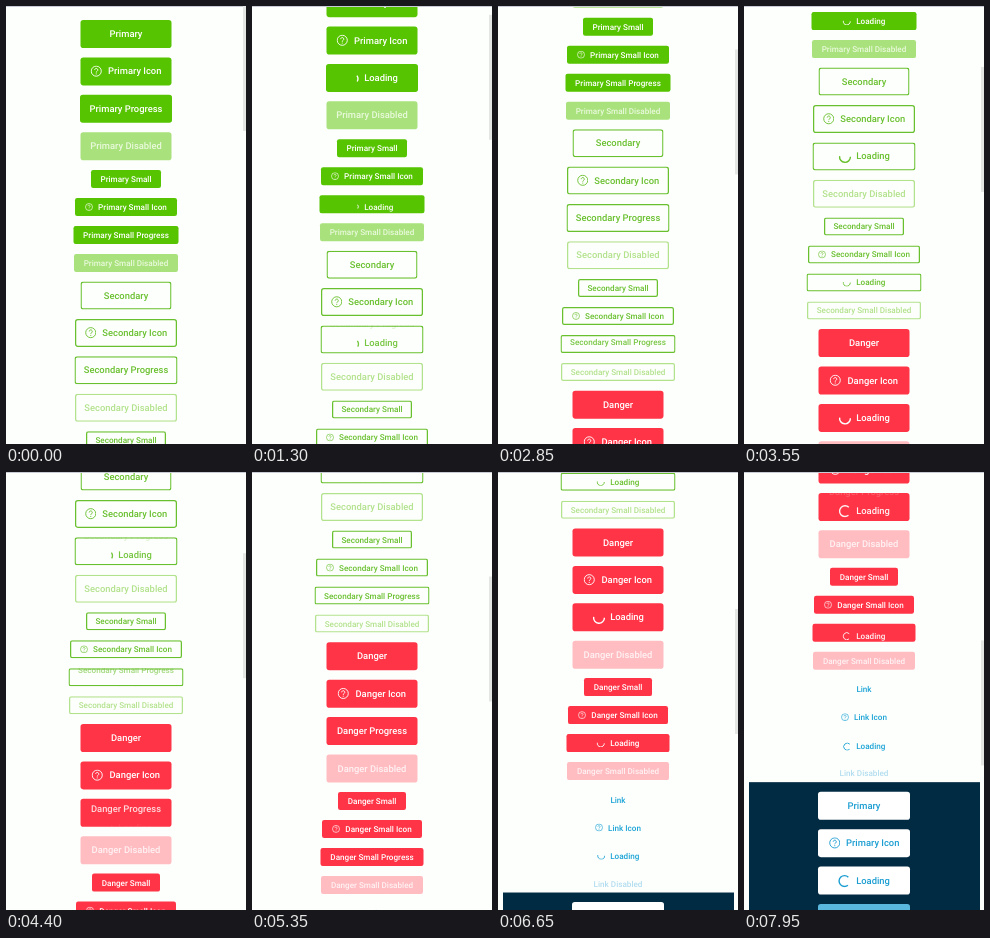
An HTML page for the animation above (8000 ms loop, 240 px wide and 438 px high).

```html
<!DOCTYPE html>
<html lang="en">
<head>
<meta charset="utf-8">
<title>Button styles</title>
<style>
  html, body { margin: 0; width: 100%; height: 100%; overflow: hidden; }
  body { position: relative; background: #fdfffc; }
  #page { position: absolute; inset: 0; }
  #panel { position: absolute; left: 4.5px; top: 901px; width: 231px; height: 640px; background: #012a43; }
  #edge { position: absolute; left: 0; top: 0; width: 100%; height: 1px; background: #c9ccd4; }
  #thumb { position: absolute; right: 0; top: 0; width: 3px; height: 125px; background: #e4e6e4; }
  .button {
    position: absolute; left: 0; top: 0; overflow: hidden; border-radius: 2.8px;
    font: 500 9.4px Roboto, sans-serif; white-space: nowrap; text-rendering: geometricPrecision;
  }
  .small { font-size: 8.15px; border-radius: 2.2px; }
  .face { position: absolute; inset: 0; display: flex; align-items: center; justify-content: center; }
  .outline { box-shadow: inset 0 0 0 1.25px; }
  svg { flex: none; fill: none; stroke: currentColor; }
  .help { width: 11.5px; height: 11.5px; margin-right: 6px; stroke-width: 1.9; }
  .small .help { width: 8px; height: 8px; margin-right: 5px; }
  .spinner { width: 13px; height: 13px; margin-right: 5px; stroke-width: 2.6; }
  .small .spinner { width: 8.5px; height: 8.5px; margin-right: 5px; }
</style>
</head>
<body>
<div id="page"><div id="panel"></div></div>
<div id="edge"></div>
<div id="thumb"></div>
<script>
const LOOP = 8000, CYCLE = 1033, LOADING_TIME = 450, SLIDE = 200, TRAVEL = 19;
const CENTER = 120;
const page = document.getElementById('page');
const thumb = document.getElementById('thumb');
const HELP = `<svg class="help" viewBox="0 0 24 24"><circle cx="12" cy="12" r="10.5"/>
  <path d="M8.8 9.6a3.2 3.2 0 1 1 4.9 2.6c-1.1.7-1.7 1.3-1.7 2.7M12 16.8v2"/></svg>`;
const SPINNER = '<svg class="spinner" viewBox="0 0 24 24"><path/></svg>';

// Each row: text, width, vertical centre.
const groups = [
  { name: 'Primary', ink: '#fff', fill: '#56c400', off: '#a9e27c', offInk: '#e9f9dc', delay: 20,
    rows: [['', 91, 28], ['Icon', 91, 65.4], ['Progress', 92, 102.8], ['Disabled', 91, 140.2]] },
  { name: 'Primary Small', ink: '#fff', fill: '#56c400', off: '#a9e27c', offInk: '#e9f9dc', delay: 50, small: true,
    rows: [['', 70, 173], ['Icon', 102, 201], ['Progress', 105, 229], ['Disabled', 104, 257]] },
  { name: 'Secondary', ink: '#69c02f', offInk: '#b3e28d', outline: true, delay: 65,
    rows: [['', 91, 289.5], ['Icon', 102, 326.9], ['Progress', 103, 364.3], ['Disabled', 102, 401.7]] },
  { name: 'Secondary Small', ink: '#69c02f', offInk: '#b3e28d', outline: true, delay: 112, small: true,
    rows: [['', 80, 434.3], ['Icon', 112, 462.3], ['Progress', 115, 490.3], ['Disabled', 114, 518.3]] },
  { name: 'Danger', ink: '#fff', fill: '#ff3547', off: '#ffbdc2', offInk: '#fff2f3', delay: 140,
    rows: [['', 91, 551], ['Icon', 91, 588.4], ['Progress', 91, 625.8], ['Disabled', 91, 663.2]] },
  { name: 'Danger Small', ink: '#fff', fill: '#ff3547', off: '#ffbdc2', offInk: '#fff2f3', delay: 144, small: true,
    rows: [['', 68, 695.6], ['Icon', 100, 723.6], ['Progress', 103, 751.6], ['Disabled', 102, 779.6]] },
  { name: 'Link', ink: '#1ba3d6', offInk: '#b2ddf0', delay: 166, small: true,
    rows: [['', 40, 808], ['Icon', 70, 836], ['Progress', 80, 864], ['Disabled', 80, 892]] },
  { name: 'Primary', ink: '#1b9dd2', fill: '#fff', off: '#5ab7de', offInk: '#1b9dd2', delay: 200,
    rows: [['', 92, 924.6], ['Icon', 92, 962], ['Progress', 92, 999.4], ['Disabled', 92, 1036.8]] }
];

const loaders = [];

function addButton(group, [suffix, width, middle]) {
  const height = group.small ? 18 : 28;
  const disabled = suffix === 'Disabled';
  const label = `<span>${group.name} ${suffix}</span>`;
  const button = document.createElement('div');
  button.className = 'button' + (group.small ? ' small' : '') + (group.outline ? ' outline' : '');
  Object.assign(button.style, {
    transform: `translate(${CENTER - width / 2}px, ${middle - height / 2}px)`,
    width: width + 'px', height: height + 'px',
    color: disabled ? group.offInk : group.ink,
    background: (disabled ? group.off : group.fill) || 'transparent'
  });
  button.innerHTML = `<div class="face">${suffix === 'Icon' ? HELP : ''}${label}</div>`;
  if (suffix === 'Progress') {
    button.innerHTML += `<div class="face">${SPINNER}<span>Loading</span></div>`;
    const [text, loading] = button.children;
    loaders.push({ text, loading, arc: loading.querySelector('path'), delay: group.delay });
  }
  page.append(button);
}
groups.forEach(group => group.rows.forEach(row => addButton(group, row)));

const clamp = x => Math.min(1, Math.max(0, x));
const ease = x => (x = clamp(x)) < .5 ? 2 * x * x : 1 - 2 * (1 - x) ** 2;

const scrollStops = [[2150, 90.7], [3550, 213.8], [4400, 284.9], [5350, 366.6], [6650, 480.4], [8000, 595]];

function scrollAt(t) {
  const [firstTime, firstY] = scrollStops[0];
  if (t <= firstTime) return firstY * clamp((t - 300) / (firstTime - 300)) ** 1.756;
  const i = scrollStops.findIndex(stop => t <= stop[0]);
  const [t0, y0] = scrollStops[i - 1], [t1, y1] = scrollStops[i];
  return y0 + (y1 - y0) * (t - t0) / (t1 - t0);
}

function arcPath(phase) {
  const age = phase - 72;
  const tail = 30 + .19 * age;
  const sweep = 265 * clamp((age - 32) / 390);
  const point = degrees => {
    const a = (degrees - 90) * Math.PI / 180;
    return `${12 + 10 * Math.cos(a)} ${12 + 10 * Math.sin(a)}`;
  };
  return `M${point(tail)}A10 10 0 ${sweep > 180 ? 1 : 0} 1 ${point(tail + sweep)}`;
}

function place(face, y, opacity) {
  face.style.transform = `translateY(${y}px)`;
  face.style.opacity = opacity;
}

function render(t) {
  const scroll = scrollAt(t);
  page.style.transform = `translateY(${-scroll}px)`;
  thumb.style.transform = `translateY(${scroll * .285}px)`;

  const phase = ((t - 4200) % CYCLE + CYCLE) % CYCLE;
  const arc = arcPath(phase);
  for (const item of loaders) {
    const age = phase - item.delay;
    const p = ease(age / SLIDE) - ease((age - LOADING_TIME) / SLIDE);
    place(item.text, -TRAVEL * p, 1 - p);
    place(item.loading, TRAVEL * (1 - p), ease(p));
    item.arc.setAttribute('d', arc);
  }
}

const start = performance.now();
function tick() {
  render((performance.now() - start) % LOOP);
  requestAnimationFrame(tick);
}
tick();
</script>
</body>
</html>
```
